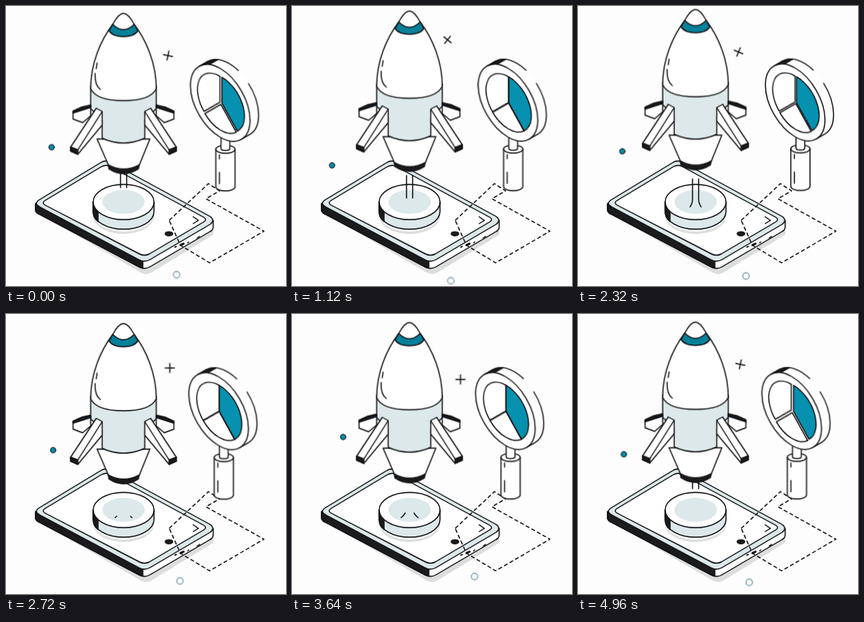
Animation of 350x350 px, one loop 5000 ms. Source, as an HTML page:

```html
<!DOCTYPE html>
<html lang="en">
<head>
<meta charset="utf-8">
<title>Rocket launch</title>
<style>
  html, body { margin: 0; width: 100%; height: 100%; overflow: hidden; background: #fdfdfd; }
  svg { display: block; width: 100vw; height: 100vh; }
  path, circle, ellipse {
    stroke: #111113; stroke-width: 1.4; fill: none;
    stroke-linecap: round; stroke-linejoin: round; vector-effect: non-scaling-stroke;
  }
  .white { fill: #fff; }
  .pale { fill: #dce8ea; }
  .teal { fill: #0591af; }
  .band { fill: #068099; }
  .dark { fill: #1b1b1d; }
  .shade { fill: #dcdede; stroke: none; }
  .flat { stroke: none; }
  .dash { stroke-dasharray: 5 3; stroke-linecap: butt; }

  /* Sine swing between two positions */
  .swing { animation: swing 2500ms cubic-bezier(.364, 0, .636, 1) -1250ms infinite alternate; }
  @keyframes swing {
    from { transform: translate(calc(var(--x) * -1), calc(var(--y) * -1)); }
    to { transform: translate(var(--x), var(--y)); }
  }
  .bob { animation-duration: 500ms; animation-delay: -210ms; }
  .rocket { --x: 0px; --y: -4px; }
  .lens { --x: 3px; --y: -.5px; }
  .cross { --x: -8.2px; --y: -20px; }
  .dot { --x: -7px; --y: 23px; }
  .ring { --x: -15px; --y: 7.7px; }

  .turn { animation: turn 5s linear infinite; }
  @keyframes turn {
    0%, 100% { transform: rotate(12deg); }
    22.4% { transform: rotate(39deg); }
    38.4% { transform: rotate(45deg); }
    54.4%, 72.8% { transform: rotate(0deg); }
    87.2% { transform: rotate(9deg); }
  }

  .slice { animation: spread 250ms cubic-bezier(.364, 0, .636, 1) -320ms infinite alternate; }
  @keyframes spread {
    from { transform: translate(0, 0); }
    to { transform: translate(var(--x), var(--y)); }
  }

  /* Exhaust runs down the path, then spreads over the pad */
  .jet { animation: jet 1s linear infinite; }
  @keyframes jet {
    0%, 100% { stroke-dasharray: 27 200; stroke-dashoffset: 0; opacity: 1; }
    12% { stroke-dasharray: 28 200; stroke-dashoffset: -12; opacity: 1; }
    36% { stroke-dasharray: 37 200; stroke-dashoffset: -17; opacity: 1; }
    64% { stroke-dasharray: 9 200; stroke-dashoffset: -49; opacity: 1; }
    72% { stroke-dasharray: 4 200; stroke-dashoffset: -54; opacity: 1; }
    74% { stroke-dasharray: 1 200; stroke-dashoffset: -57; opacity: 0; }
    75%, 85% { stroke-dasharray: 1 200; stroke-dashoffset: 0; opacity: 0; }
    92% { stroke-dasharray: 15 200; stroke-dashoffset: 0; opacity: 1; }
    96% { stroke-dasharray: 18 200; stroke-dashoffset: 0; opacity: 1; }
  }
</style>
</head>
<body>
<svg viewBox="0 0 350 350">
  <defs>
    <g id="fins">
      <path class="white" d="M106 124L84 132V141L96 145.500L106 137Z"/>
      <path class="dark" d="M106 123.500L95 126L84 131V133.500L106 126.500Z"/>
      <path class="white" d="M113 127.500L120.400 131.500V148.500L90 185L81 181V176Z"/>
      <path d="M120.400 131.500L90 179.500"/>
      <path class="dark" d="M81 176L90 179.500V185L81 181Z"/>
    </g>
  </defs>

  <!-- Phone -->
  <path class="shade" d="M42 260L168 333Q175 337 182 333L259 286V276L173 326Z"/>
  <path class="white" d="M37 247V255Q37 258 41 260L166 326Q173 330 180 326L255 282Q259 280 259 276V268L173 300Z"/>
  <path class="dark" d="M37 247V255Q37 258 41 260L166 326L171 327.800V319L42 251Z"/>
  <path class="pale" d="M42 242L118 196Q124 192 130 195L255 263Q262 268 255 273L180 317Q173 321 166 317L42 251Q34 247 42 242Z"/>
  <path class="white" d="M49 243L119 201Q124 198 129 200L247 264Q252 267 247 270L179 310Q173 313 167 310L49 249Q44 246 49 243Z"/>
  <ellipse class="dark flat" cx="203.700" cy="284.700" rx="5.400" ry="3.300"/>
  <path d="M234 263.500L240.500 268L234 272"/>
  <path d="M211 301.500L213 300.500M227 296L228.500 295M239 290L242 288"/>
  <path d="M218 299L222 297" style="stroke-width:2.6"/>

  <!-- Dashed arrow -->
  <path class="dash" d="M204 268L253 222L267 231L250 241L322.500 281.500L254.500 321L218 299Z"/>

  <!-- Launch pad -->
  <path class="shade" d="M109 260A38 22 0 0 0 185 260V263A38 22 0 0 1 109 263Z"/>
  <path class="pale" d="M109 245V257A38 22 0 0 0 185 257V245Z"/>
  <path class="dark" d="M109 245V257Q109 265 115 269.500V257Z"/>
  <ellipse class="white" cx="147" cy="245" rx="38" ry="22"/>
  <ellipse class="pale flat" cx="147" cy="244.800" rx="26.500" ry="15"/>

  <path class="jet" d="M143.200 200V241Q143.200 249.500 136.500 254.500"/>
  <path class="jet" d="M150.800 200V241Q150.800 249.500 157.500 254.500"/>

  <!-- Rocket -->
  <g transform="translate(-.2 -.7)">
    <g class="swing bob rocket">
      <path class="dark" d="M127 194L129 203.500Q147 215 165.500 203.500L168 194Z"/>
      <path class="white" d="M114 166L128 198Q147 209 167 198L180 166Z"/>
      <path class="pale" d="M106 100V128L120.400 142V165Q147 177 173.600 165V142L188 128V100Z"/>
      <path class="white" d="M147 9Q141 9 134 22C118 43 106 72 106 103Q113 118 147 118Q181 118 188 103C188 72 176 43 160 22Q153 9 147 9Z"/>
      <path class="band" d="M133.500 22.500L129 31Q134 38 147 38Q160 38 165 31L160.500 22.500Q147 36 133.500 22.500Z"/>
      <path d="M114 71L113 78M111.500 84Q111 99 118 104"/>
      <use href="#fins"/>
      <use href="#fins" transform="matrix(-1 0 0 1 294 0)"/>
    </g>
  </g>

  <!-- Magnifier -->
  <g class="swing bob lens">
    <path class="white" d="M263 179V226A12 5 0 0 0 287 226V179"/>
    <ellipse class="white" cx="275" cy="179" rx="12" ry="5"/>
    <path class="white" d="M269.500 160V178A5.500 2.500 0 0 0 280.500 178V160"/>
    <path d="M267.500 186V191M267.500 208V222"/>
    <g transform="matrix(.866 .5 0 1 268.500 121)">
      <path class="white flat" d="M-30.400 -30.400l12.500 -12.500A43 43 0 0 1 42.900 17.900L30.400 30.400Z"/>
      <path d="M-30.400 -30.400l12.500 -12.500A43 43 0 0 1 26 -53.500M41 -44.500A43 43 0 0 1 42.900 17.900L30.400 30.400"/>
      <path class="dark" d="M-30.400 -30.400l12.500 -12.500A43 43 0 0 1 -3.500 -52.400L-16 -39.900A43 43 0 0 0 -30.400 -30.400Z"/>
      <circle class="white" r="43"/>
    </g>
    <g transform="matrix(.866 .5 0 1 269.300 121.300)">
      <path class="slice white" style="--x:-1.600px;--y:-.6px" d="M0 0L-23 23A32.500 32.500 0 0 1 0 -32.500Z"/>
      <path class="slice white" style="--x:0px;--y:1.900px" d="M0 0L22.200 23.800A32.500 32.500 0 0 1 -23 23Z"/>
      <path class="slice teal" style="--x:1.900px;--y:-.8px" d="M0 0V-32.500A32.500 32.500 0 0 1 22.200 23.800Z"/>
    </g>
  </g>

  <!-- Floating marks -->
  <g transform="translate(202.500 62)">
    <g class="swing cross"><path class="turn" d="M-5.800 0H5.800M0 -5.800V5.800"/></g>
  </g>
  <g transform="translate(57 176.500)">
    <circle class="swing dot teal" r="3.400" style="stroke-width:1"/>
  </g>
  <g transform="translate(213.300 335.800)">
    <circle class="swing ring white" r="4" style="stroke:#7fa3b0"/>
  </g>
</svg>
</body>
</html>
```
